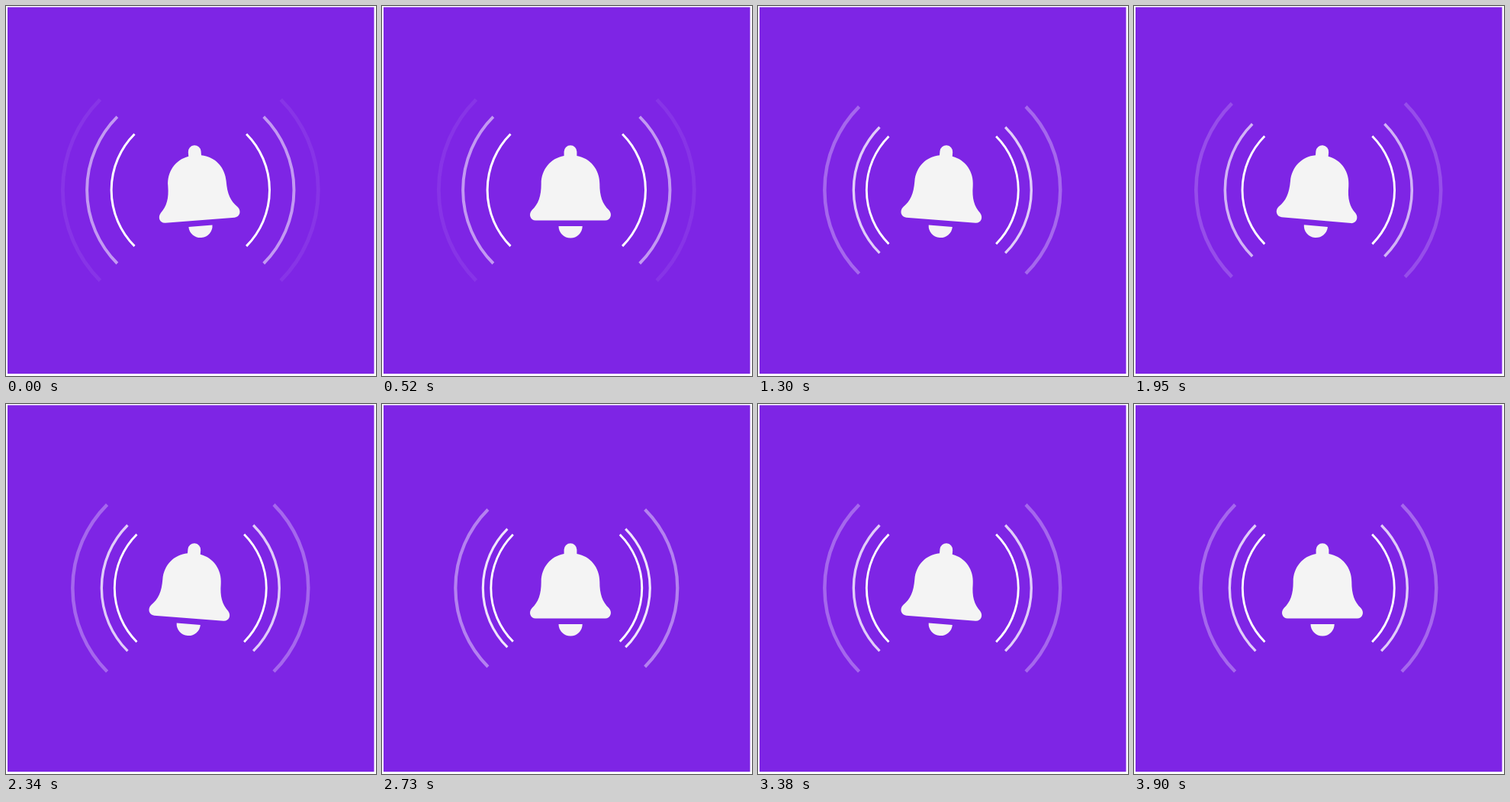
An HTML page that plays this animation: 485 by 484 pixels, repeating every 4030 ms.

```html
<!DOCTYPE html>
<html lang="en">
<head>
<meta charset="utf-8">
<title>Ringing bell</title>
<style>
  html, body { margin: 0; width: 100%; height: 100%; overflow: hidden; background: #fff; }
  svg { display: block; width: 485px; height: 484px; }
  .wave { fill: none; stroke: #fff; stroke-width: 2.9; }
  #bell { fill: #f4f4f4; }
</style>
</head>
<body>
<svg viewBox="0 0 485 484">
  <defs>
    <path id="arcs" d="M-70.7 -70.7A100 100 0 0 0 -70.7 70.7M70.7 -70.7A100 100 0 0 1 70.7 70.7"/>
  </defs>
  <rect x="2" y="1.5" width="480.5" height="479.5" fill="#7e25e5"/>
  <use href="#arcs" class="wave"/>
  <use href="#arcs" class="wave"/>
  <use href="#arcs" class="wave"/>
  <g id="bell">
    <path d="M238.6 196V190.6a8.4 8.4 0 0 1 16.8 0V196
             C273 199 285.3 214 285.3 232.5C285.3 249 289 259 297.5 267
             C302.5 272.5 299.5 280.5 292.5 280.5H201.5
             C194.5 280.5 191.5 272.5 196.5 267
             C205 259 208.7 249 208.7 232.5C208.7 214 221 199 238.6 196Z"/>
    <path d="M231.5 288H262.7a15.6 15.4 0 0 1 -31.2 0Z"/>
  </g>
</svg>
<script>
const STEP = 130, LOOP = 4030;

// Wave radius by step of life; a new wave starts every 4 steps.
const LIFE = 12, LEAD = 3;
const radius = [99, 99.5, 99.8, 103.7, 109.5, 116.5, 122.5, 135.7, 145.5, 154.5, 160.5, 167.5];

// Two swings, then a short rest.
const tilt = [-4.5, 0, 4.5, -5, 0, 0, 0, 5];

const waves = document.querySelectorAll('.wave');
const bell = document.getElementById('bell');
const start = performance.now();

function drawWave(wave, life) {
  const fade = Math.min(1, 1 - (life - LEAD) / 8.6);
  wave.setAttribute('transform', `translate(241.8 240.8) scale(${radius[life] / 100})`);
  wave.setAttribute('opacity', fade);
}

function draw(now) {
  const time = Math.max(0, now - start) % LOOP;
  const step = Math.floor(time / STEP);
  waves.forEach((wave, i) => drawWave(wave, (step + LEAD + i * 4) % LIFE));
  bell.setAttribute('transform', `rotate(${tilt[step % tilt.length]} 247 188)`);
  requestAnimationFrame(draw);
}
draw(start);
</script>
</body>
</html>
```
